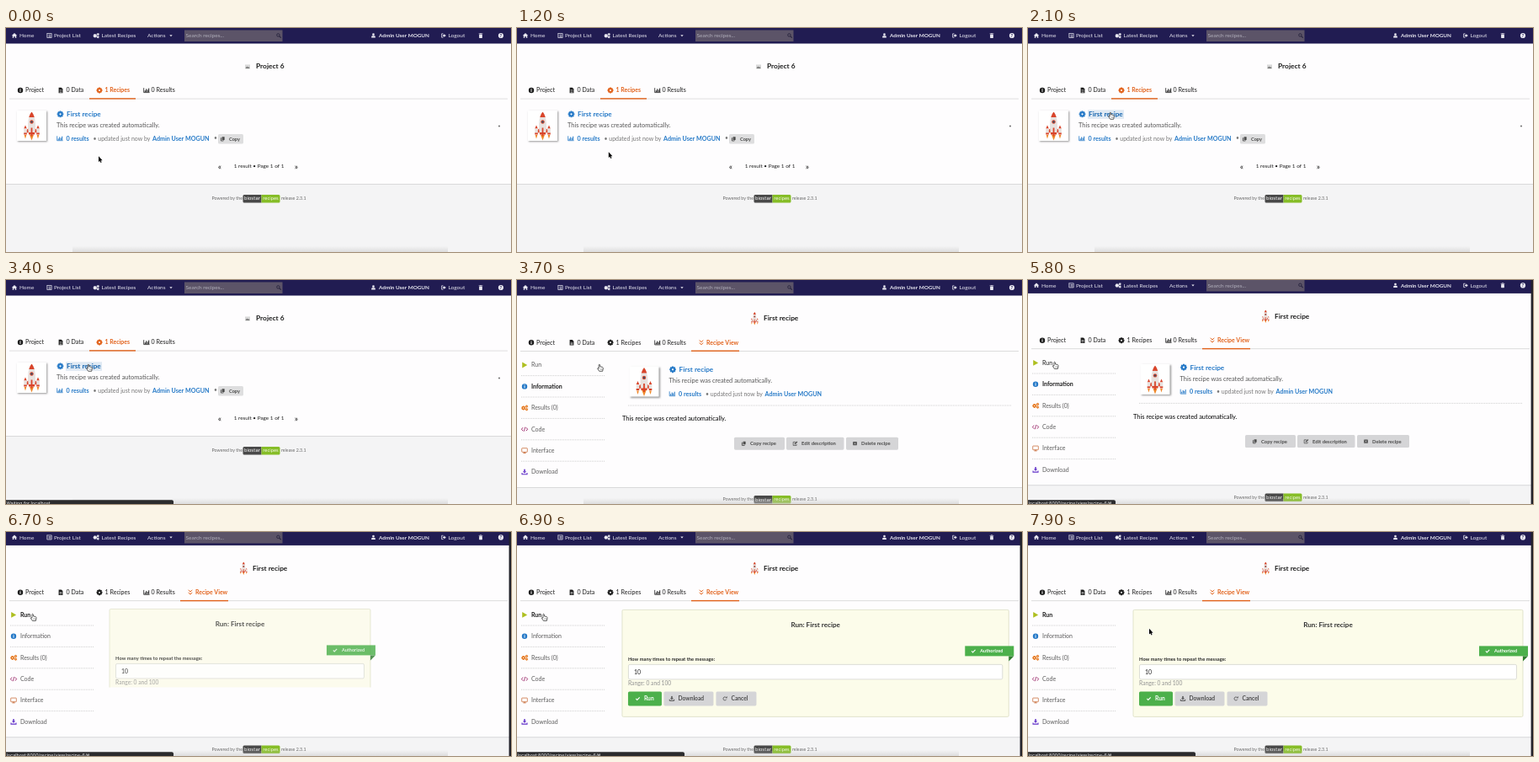
Write an HTML page with a canvas that moves like this. It is 600 by 266 pixels and loops after 8 s.

```html
<!DOCTYPE html>
<html lang="en">
<head>
<meta charset="utf-8">
<title>Recipe walkthrough</title>
<style>
html, body { margin: 0; width: 100%; height: 100%; overflow: hidden; background: #fff; }
canvas { display: block; width: 600px; height: 266px; }
</style>
</head>
<body>
<canvas id="stage"></canvas>
<script>
const LOOP = 8000, W = 600, H = 266;
const USER = 'Admin User MOGUN';
const BLUE = '#2579c7', ORANGE = '#e2621b', INK = '#1c1c1c', GREY = '#777';
const canvas = document.getElementById('stage');
const c = canvas.getContext('2d');
const dpr = window.devicePixelRatio || 1;
canvas.width = W * dpr;
canvas.height = H * dpr;

const lerp = (a, b, p) => a + (b - a) * p;
const prog = (t, a, b) => Math.min(1, Math.max(0, (t - a) / (b - a)));
const swing = p => 0.5 - Math.cos(Math.PI * p) / 2;

function text(s, x, y, size, color = INK, weight = 400, align = 'left', face = 'Lato') {
  c.font = `${weight} ${size}px ${face}, sans-serif`;
  c.textAlign = align;
  c.fillStyle = color;
  c.fillText(s, x, y + size * 0.35);
}
const bold = (s, x, y, size, color, align) => text(s, x, y, size, color, 700, align);

function rect(x, y, w, h, color) {
  c.fillStyle = color;
  c.fillRect(x, y, w, h);
}
function box(x, y, w, h, r, fill, stroke) {
  c.beginPath();
  c.roundRect(x, y, w, h, r);
  if (fill) { c.fillStyle = fill; c.fill(); }
  if (stroke) { c.strokeStyle = stroke; c.lineWidth = 0.7; c.stroke(); }
}
function poly(pts, color) {
  c.beginPath();
  for (let i = 0; i < pts.length; i += 2) c.lineTo(pts[i], pts[i + 1]);
  c.closePath();
  c.fillStyle = color;
  c.fill();
}
function line(pts, color, width = 1) {
  c.beginPath();
  for (let i = 0; i < pts.length; i += 2) c.lineTo(pts[i], pts[i + 1]);
  c.strokeStyle = color;
  c.lineWidth = width;
  c.stroke();
}
function disc(x, y, r, color) {
  c.beginPath();
  c.arc(x, y, r, 0, 7);
  c.fillStyle = color;
  c.fill();
}
function ring(x, y, r, color, width, from = 0, to = 7) {
  c.beginPath();
  c.arc(x, y, r, from, to);
  c.strokeStyle = color;
  c.lineWidth = width;
  c.stroke();
}
function dotted(x1, x2, y) {
  c.setLineDash([1, 1]);
  line([x1, y, x2, y], '#c4c4c4', 0.8);
  c.setLineDash([]);
}
function at(x, y, draw, scale = 1) {
  c.save();
  c.translate(x, y);
  c.scale(scale, scale);
  draw();
  c.restore();
}

function gear(x, y, r, color) {
  for (let i = 0; i < 4; i++) {
    const a = i * Math.PI / 4, dx = Math.cos(a) * r, dy = Math.sin(a) * r;
    line([x - dx, y - dy, x + dx, y + dy], color, r * 0.5);
  }
  ring(x, y, r * 0.52, color, r * 0.5);
  disc(x, y, r * 0.28, '#fff');
}

// Each icon is drawn about its own centre, roughly 7px wide.
const icons = {
  home(k) { poly([-3.5, 0, 0, -3.2, 3.5, 0, 2.5, 0, 2.5, 3, 0.8, 3, 0.8, 1, -0.8, 1, -0.8, 3, -2.5, 3, -2.5, 0], k); },
  list(k) {
    line([-3, -2.8, 3, -2.8, 3, 2.8, -3, 2.8, -3, -3.2], k, 0.8);
    for (const y of [-1, 0.3, 1.6]) line([-2, y, -1.2, y], k, 0.7), line([-0.5, y, 2, y], k, 0.7);
  },
  cogs(k) { gear(-1.3, 0.2, 2.5, k); gear(2.5, -1.7, 1.6, k); gear(2.5, 1.9, 1.6, k); },
  cog(k) { gear(0, 0, 3.5, k); },
  caret(k) { poly([-1.7, -0.8, 1.7, -0.8, 0, 1.2], k); },
  search(k) { ring(-0.6, -0.6, 1.7, k, 0.9); line([0.7, 0.7, 2.7, 2.7], k, 1.1); },
  user(k) { disc(0, -1.5, 1.5, k); box(-2.6, 0.3, 5.2, 2.6, [1.5, 1.5, 0.3, 0.3], k); },
  exit(k) { line([-0.6, -2.4, -2.6, -2.4, -2.6, 2.4, -0.6, 2.4], k, 0.9); poly([-1.2, -0.8, 0.5, -0.8, 0.5, -2.3, 3, 0, 0.5, 2.3, 0.5, 0.8, -1.2, 0.8], k); },
  trash(k) { rect(-2.6, -2.8, 5.2, 0.8, k); rect(-1, -3.3, 2, 0.6, k); box(-2.1, -1.6, 4.2, 4.8, 0.5, k); },
  help(k) { disc(0, 0, 3.1, k); bold('?', 0, 0, 5, '#211c52', 'center'); },
  info(k) { disc(0, 0, 3.2, k); rect(-0.5, -0.6, 1, 2.4, '#fff'); rect(-0.5, -2, 1, 0.9, '#fff'); },
  file(k) { poly([-2.4, -3.3, 0.8, -3.3, 2.4, -1.6, 2.4, 3.3, -2.4, 3.3], k); for (const y of [-0.4, 0.8, 2]) rect(-1.4, y, 2.8, 0.5, '#fff'); },
  chart(k) {
    line([-3.3, -2.8, -3.3, 2.6, 3.6, 2.6], k, 0.8);
    [1.8, 3.6, 2.6, 4.4].forEach((h, i) => rect(-2.3 + i * 1.5, 2 - h, 1, h, k));
  },
  down(k) { for (const y of [-1.6, 1.4]) line([-2.3, y - 1.2, 0, y + 1, 2.3, y - 1.2], k, 1); },
  copy(k) { box(-1, -2.7, 3.4, 4, 0.3, k); line([-1.7, -1.3, -2.3, -1.3, -2.3, 2.5, 0.9, 2.5, 0.9, 1.9], k, 1); },
  edit(k) { line([0.6, -2, -2.6, -2, -2.6, 2.5, 1.8, 2.5, 1.8, 0.8], k, 0.8); line([-0.7, 0.9, 2.6, -2.4], k, 1.4); },
  cross(k) { box(-2.6, -2.4, 5.2, 4.8, 0.6, k); line([-1.2, -1.2, 1.2, 1.2], '#ddd', 0.7); line([1.2, -1.2, -1.2, 1.2], '#ddd', 0.7); },
  play(k) { poly([-2.8, -3.4, 3.2, 0, -2.8, 3.4], k); },
  code(k) { line([-1.9, -2, -3.6, 0, -1.9, 2], k, 1); line([1.9, -2, 3.6, 0, 1.9, 2], k, 1); line([0.8, -2.6, -0.8, 2.6], k, 0.9); },
  screen(k) { box(-3.3, -2.9, 6.6, 4.6, 0.5, null, k); rect(-1.6, 2.5, 3.2, 0.8, k); rect(-0.4, 1.7, 0.8, 1, k); },
  load(k) { rect(-0.8, -3.3, 1.6, 2.8, k); poly([-2.2, -0.8, 2.2, -0.8, 0, 1.4], k); line([-3, 1, -3, 2.7, 3, 2.7, 3, 1], k, 1.1); },
  check(k) { line([-2.4, 0.1, -0.8, 1.7, 2.5, -1.8], k, 1.2); },
  redo(k) { ring(0, 0, 2.2, k, 0.9, 0.4, 5.4); poly([0.6, -0.8, 3, -0.8, 3, -3.1], k); }
};
const icon = (name, x, y, color, scale = 1) => at(x, y, () => icons[name](color), scale);

function rocket(x, y, scale) {
  const red = '#d9452b', pale = '#e8e2df', flame = '#f0892a';
  at(x, y, () => {
    poly([-3, 2, -8, 6, -8, 9, -3, 7], red);
    poly([3, 2, 8, 6, 8, 9, 3, 7], red);
    for (const s of [-7.5, 7.5]) {
      poly([s - 1.8, 3, s, -1, s + 1.8, 3], red);
      rect(s - 1.8, 3, 3.6, 6, pale);
      rect(s - 1.8, 8, 3.6, 2, red);
      poly([s - 1.4, 10.5, s + 1.4, 10.5, s, 15], flame);
    }
    poly([-2.6, 10, 2.6, 10, 0, 17], flame);
    c.beginPath();
    c.moveTo(0, -17);
    c.bezierCurveTo(5.5, -10, 5, 2, 3.4, 10);
    c.lineTo(-3.4, 10);
    c.bezierCurveTo(-5, 2, -5.5, -10, 0, -17);
    c.fillStyle = pale;
    c.fill();
    c.save();
    c.clip();
    rect(-8, -17, 16, 6.5, red);
    rect(-8, 7.5, 16, 3, red);
    c.restore();
    disc(0, -5, 2.2, red);
    disc(0, -5, 1.2, '#38536b');
    rect(-0.9, 2, 1.8, 10, red);
  }, scale);
}
function thumb(x, y) {
  c.save();
  c.shadowColor = 'rgba(0,0,0,.4)';
  c.shadowBlur = 2 * dpr;
  c.shadowOffsetX = c.shadowOffsetY = dpr;
  rect(x, y, 35, 36, '#fff');
  c.restore();
  rocket(x + 17.5, y + 18.5, 1);
}

function header() {
  rect(0, -4, W, 22.5, '#211c52');
  const k = '#e8e7f0', y = 9;
  const item = (name, ix, s, x) => { icon(name, ix, y, k, 0.9); text(s, x, y, 6.5, k); };
  item('home', 10, 'Home', 16);
  item('list', 51.5, 'Project List', 57);
  item('cogs', 107, 'Latest Recipes', 113.5);
  text('Actions', 168, y, 6.5, k);
  icon('caret', 196, y, k);
  rect(212, 2.5, 116.5, 13.5, '#5c5468');
  text('Search recipes...', 213.5, y, 6.5, '#b3b1bd');
  icon('search', 324, y, '#24213c');
  icon('user', 436.5, y, k, 0.9);
  bold(USER, 443, y, 6.35, k);
  item('exit', 520, 'Logout', 525.5);
  icon('trash', 564, y, k, 0.9);
  icon('help', 588, y, k);
}

function tabs(y, active) {
  rect(4, y + 9.7, 592, 0.7, '#cfcfcf');
  const all = [['info', 'Project', 17, 23], ['file', '0 Data', 65, 71.5], ['cog', '1 Recipes', 111, 117.5], ['chart', '0 Results', 167, 172.5]];
  if (active === 4) all.push(['down', 'Recipe View', 219, 225]);
  all.forEach(([name, s, ix, x], i) => {
    const on = i === active, k = on ? ORANGE : INK;
    icon(name, ix, y, k);
    text(s, x, y, on ? 6.95 : 7.1, k, on ? 700 : 400);
  });
  const [x, w] = active === 4 ? [207, 57] : [99, 55];
  rect(x, y + 9.2, w, 1.4, ORANGE);
}

function footer(top, y) {
  rect(0, top, W, H + 5 - top, '#f4f4f5');
  rect(0, top, W, 0.8, '#d2d2d4');
  text('Powered by the', 244.5, y, 5.3, '#666');
  box(281.5, y - 4.5, 22, 9.5, [1.5, 0, 0, 1.5], '#494949');
  box(303.5, y - 4.5, 22, 9.5, [0, 1.5, 1.5, 0], '#86bd27');
  text('biostar', 292.5, y, 5.5, '#fff', 400, 'center', 'DejaVu Sans');
  text('recipes', 314.5, y, 5.1, '#fff', 400, 'center', 'DejaVu Sans');
  text('release 2.3.1', 327, y, 5.3, '#666');
}

function recipeHead(x, y, hover) {
  if (hover) rect(x + 11, y - 5, 43, 10.5, '#dfe9f3');
  icon('cog', x + 4.5, y, BLUE, 1.1);
  bold('First recipe', x + 12, y, 8.2, hover ? '#1766b0' : BLUE);
  text('This recipe was created automatically.', x, y + 13.3, 7.4, '#555');
  icon('chart', x + 4, y + 28.8, BLUE);
  bold('0 results', x + 11.5, y + 28.8, 7.2, BLUE);
  text('• updated just now by', x + 43.5, y + 28.8, 6.95, GREY);
  bold(USER, x + 114, y + 28.8, 7.15, BLUE);
}

function button(x, y, w, h, name, s, size, fill = '#d5d5d7', k = '#4c4c4c', gap = 19) {
  box(x, y, w, h, 1.6, fill);
  icon(name, x + gap - 7.5, y + h / 2, k, 0.9);
  bold(s, x + gap, y + h / 2, size, k);
}

function listPage(hover) {
  rect(284, 43.5, 6, 5, '#d8d8d8');
  poly([284.5, 48, 286.3, 45.5, 287.4, 46.7, 288.3, 46, 289.6, 48], '#777');
  bold('Project 6', 297, 45, 8.4);
  tabs(74, 2);
  thumb(13, 98);
  recipeHead(60, 102.3, hover);
  text('•', 247, 131, 6.8, GREY);
  button(252, 126, 30, 11.5, 'copy', 'Copy', 5.6, '#dededf', '#4c4c4c', 13);
  disc(586, 116.5, 1.1, '#777');
  text('«', 254, 164, 10, INK, 400, 'center');
  text('1 result • Page 1 of 1', 300.5, 164, 6.4, INK, 400, 'center');
  text('»', 345, 164, 10, INK, 400, 'center');
  footer(185, 202.5);
}

function sidebar(active, hover) {
  const rows = [
    ['play', 'Run', '#aebf20'], ['info', 'Information', BLUE], ['cogs', 'Results (0)', '#e5781f'],
    ['code', 'Code', '#a03070'], ['screen', 'Interface', '#c25c25'], ['load', 'Download', '#6435c9']
  ];
  rows.forEach(([name, s, k], i) => {
    const y = 101 + i * 25.4, on = i === active;
    icon(name, 9, y, k);
    text(s, 17, y, 7, on || i === hover ? INK : '#5c5c5c', on ? 700 : 400);
    if (i < 5) dotted(5, 105, y + 12.6);
  });
}

function infoPane() {
  thumb(133.5, 102.5);
  recipeHead(180.5, 106.3, false);
  dotted(132, 588, 149);
  text('This recipe was created automatically.', 125, 164.5, 7.45, '#000');
  button(258, 186.7, 60, 15, 'copy', 'Copy recipe', 5.85);
  button(320, 186.7, 68.5, 15, 'edit', 'Edit description', 5.85, undefined, undefined, 18);
  button(391, 186.7, 62, 15, 'cross', 'Delete recipe', 5.85, undefined, undefined, 18);
}

function runPane(p) {
  if (p <= 0) return;
  const w = 463 * p, h = 127 * Math.min(1, p * 1.09);
  c.save();
  c.globalAlpha = Math.sqrt(p);
  c.translate(125 - 6 * (1 - p), 95 - 3 * (1 - p));
  c.beginPath();
  c.rect(-1, -1, w + 8, h + 1.5);
  c.clip();
  box(0, 0, w, 127, 1.5, '#fcfcea', '#d6d8bb');
  bold('Run: First recipe', w / 2, 18, 8.1, '#333', 'center');
  rect(w - 52, 43, 58, 12, '#4cb04b');
  poly([w, 55, w + 6, 55, w, 61], '#2f7d2f');
  icon('check', w - 42, 49, '#fff', 0.9);
  bold('Authorized', w - 34, 49, 5.5, '#fff');
  bold('How many times to repeat the message:', 7, 59, 5.8, '#2b2b2b');
  box(7.5, 65, Math.max(0, w - 15), 17.5, 1.6, '#fff', '#cfd0cb');
  text('10', 14, 74, 7, '#222');
  text('Range: 0 and 100', 7, 87.3, 6.7, '#929292');
  button(7, 97, 40, 17, 'check', 'Run', 6.7, '#4cb04b', '#fff');
  button(49.5, 97, 59, 17, 'load', 'Download', 6.7, undefined, undefined, 17);
  button(111.5, 97, 48, 17, 'redo', 'Cancel', 6.7, undefined, undefined, 18);
  c.restore();
}

function recipePage(t) {
  const ran = t >= 6335;
  rocket(282.3, 45.8, 0.46);
  bold('First recipe', 293, 45.5, 8.3);
  tabs(74.3, 4);
  sidebar(ran ? 0 : 1, t >= 5400 ? 0 : -1);
  if (ran) runPane(swing(prog(t, 6335, 6935)));
  else infoPane();
  footer(246, 260.6);
}

function status(s, w) {
  box(-2, 261.3, w + 2, 8, 2, '#2b2b2d');
  text(s, 0.5, 265.2, 5.4, '#eee', 400, 'left', 'Inter');
}

function arrow() {
  c.beginPath();
  for (const [x, y] of [[0, 0], [0, 6.8], [1.5, 5.4], [2.5, 7.7], [3.6, 7.2], [2.6, 5], [4.6, 5]]) c.lineTo(x, y);
  c.closePath();
  c.lineWidth = 1;
  c.strokeStyle = '#fff';
  c.stroke();
  c.fillStyle = '#000';
  c.fill();
}
function hand() {
  c.beginPath();
  c.moveTo(-0.8, 0.6);
  c.quadraticCurveTo(0, -0.8, 0.8, 0.6);
  c.lineTo(0.9, 3);
  c.quadraticCurveTo(5, 3, 5, 5);
  c.lineTo(4.2, 9);
  c.lineTo(-0.2, 9);
  c.lineTo(-2.6, 5.4);
  c.quadraticCurveTo(-2.4, 4.2, -0.8, 5.4);
  c.closePath();
  c.fillStyle = '#fff';
  c.fill();
  c.strokeStyle = '#222';
  c.lineWidth = 0.8;
  c.stroke();
  for (const x of [1.3, 2.5, 3.6]) line([x, 5.5, x, 7.5], '#555', 0.4);
}

const moves = [
  [1050, 1800, 97.9, 100.2],
  [4650, 5400, 31.6, 97.3],
  [7350, 7900, 144, 114.8]
];
function cursor(t) {
  let x = 110, y = 152.3;
  for (const [a, b, tx, ty] of moves) {
    const p = swing(prog(t, a, b));
    x = lerp(x, tx, p);
    y = lerp(y, ty, p);
  }
  const pointing = (t >= 1700 && t < 4700) || (t >= 5350 && t < 7450);
  if (pointing) at(x, y, hand, 0.9);
  else at(x, y, arrow);
}

function draw(t) {
  c.setTransform(dpr, 0, 0, dpr, 0, 0);
  rect(0, 0, W, H, '#fefdfe');
  const second = t >= 3600;
  c.save();
  if (second) c.translate(0, -2.6 * swing(prog(t, 3800, 4100)));
  if (second) recipePage(t);
  else listPage(t >= 1700);
  header();
  c.restore();

  const g = c.createLinearGradient(0, 259, 0, 266);
  g.addColorStop(0, 'rgba(205,205,205,0)');
  g.addColorStop(1, 'rgba(205,205,205,.6)');
  rect(79, 259, 446, 7, g);
  if (t >= 3800) rect(597.6, 0, 2.4, H, '#22222a');

  if (t >= 2700 && t < 3600) status('Waiting for localhost...', 199);
  if (t >= 5500) status('localhost:8000/recipe/view/recipe-6/#', lerp(104, 199, swing(prog(t, 6300, 6500))));
  cursor(t);
}

const start = performance.now();
function tick() {
  draw((performance.now() - start) % LOOP);
  requestAnimationFrame(tick);
}
tick();
</script>
</body>
</html>
```
